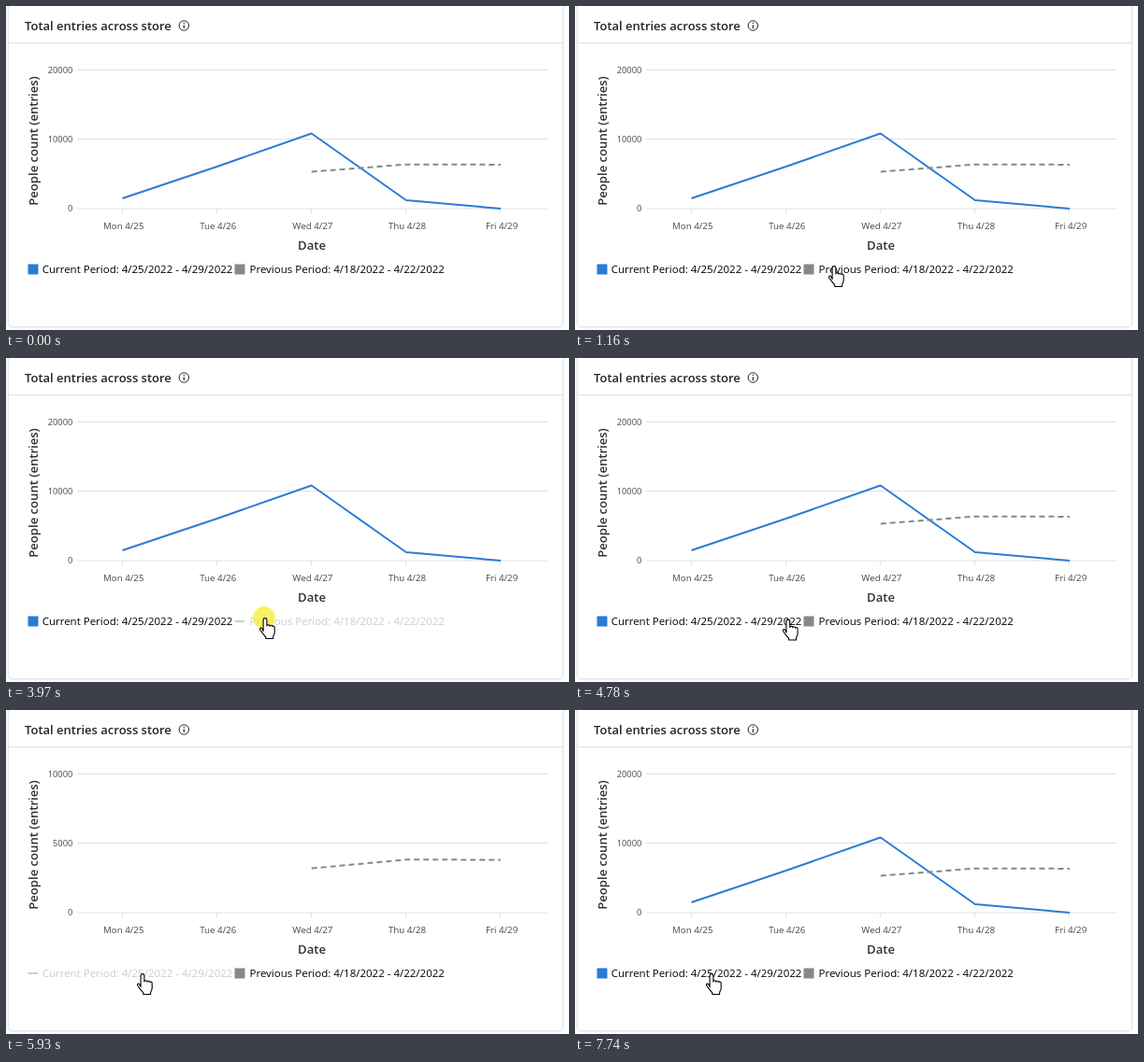
An HTML page that plays this animation: 602 px wide and 347 px high, repeating every 8 s.

```html
<!DOCTYPE html>
<html lang="en">
<head>
<meta charset="utf-8">
<title>Total entries across store</title>
<style>
  html, body { margin: 0; width: 100%; height: 100%; overflow: hidden; background: #fff; }
  svg { display: block; width: 100%; height: 100%; font-family: "Open Sans", "Noto Sans", sans-serif; }
  .card { fill: #fff; filter: drop-shadow(0 .6px 1.4px rgba(0, 0, 0, .28)); }
  .rule { stroke: #e1e1e1; }
  .title { font-size: 13px; font-weight: 600; fill: #252423; }
  .axis { font-size: 13.1px; font-weight: 600; fill: #323130; text-anchor: middle; }
  .tick { font-size: 9.75px; fill: #484644; }
  .value { font-size: 9.3px; text-anchor: end; }
  .line { fill: none; stroke-width: 2; stroke-linejoin: bevel; }
  .legend { font-size: 11.5px; fill: #000; }
  .legend .dash { display: none; }
  .legend.off { fill: #ccc; }
  .legend.off .box { display: none; }
  .legend.off .dash { display: inline; }
  .cursor { fill: #fff; stroke: #000; stroke-width: 1.1; stroke-linejoin: round; }
</style>
</head>
<body>
<svg viewBox="0 0 602 347">
  <rect class="card" x="3" y="-6" width="592" height="349" rx="4"/>
  <path class="rule" d="M3 39.5H595"/>
  <text class="title" x="20" y="25.6">Total entries across store</text>
  <g fill="none" stroke="#252423">
    <circle cx="190.3" cy="21" r="5.2"/>
    <path d="M190.3 20.2V24M190.3 17.8V19.1" stroke-width="1.2"/>
  </g>

  <g id="grid"></g>
  <text class="axis" transform="translate(34 144.5) rotate(-90)">People count (entries)</text>
  <text class="axis" x="327" y="261">Date</text>

  <path id="current" class="line" stroke="#2b7cd3"/>
  <path id="previous" class="line" stroke="#888" stroke-dasharray="6 4"/>

  <g id="currentKey" class="legend">
    <rect class="box" x="23.5" y="276.5" width="11" height="11" fill="#2b7cd3"/>
    <path class="dash" d="M24 282H34" stroke="#ccc" stroke-width="2"/>
    <text x="38.7" y="286">Current Period: 4/25/2022 - 4/29/2022</text>
  </g>
  <g id="previousKey" class="legend">
    <rect class="box" x="244.5" y="276.5" width="11" height="11" fill="#888"/>
    <path class="dash" d="M245 282H255" stroke="#ccc" stroke-width="2"/>
    <text x="260.5" y="286">Previous Period: 4/18/2022 - 4/22/2022</text>
  </g>

  <circle id="click" r="12" fill="#f5ee1e" opacity=".68"/>
  <g id="cursor" class="cursor">
    <path id="arrow" d="M0 0V15.5L3.6 12.2 6 17.6 8.3 16.6 6 11.4H11Z"/>
    <path id="hand" d="M-1.9 14V2a1.9 1.9 0 0 1 3.8 0V8.4c.2-1.6 3-1.4 3 .3c.2-1.5 2.9-1.2 2.9 .5c.2-1.3 2.4-1 2.4 1V15.4c0 2-1.6 3-1.6 5V22H.8V20.4C-.6 18.4-3.2 16-5.2 12.8c-1-1.8 1-3 2-1.6z"/>
  </g>
</svg>
<script>
const LOOP = 8000, BASE = 217;
const days = ["Mon 4/25", "Tue 4/26", "Wed 4/27", "Thu 4/28", "Fri 4/29"];
const currentHeights = [11, 45, 80.5, 9, 0];
const previousHeights = [39.5, 47.3, 47.1];

const el = id => document.getElementById(id);
const dayX = i => 124.5 + 101.1 * i;
const between = (t, a, b) => t >= a && t < b;
const show = (id, on) => { el(id).style.display = on ? "" : "none"; };
const lerp = (a, b, p) => a + (b - a) * p;

// Index of the last of `count` evenly spaced steps reached at time t (-1 before the first).
const stepAt = (t, start, end, count) => t < start ? -1 :
  Math.min(count - 1, Math.floor((t - start) / (end - start) * (count - 1) + .15));

// The easing starts a quarter step after the first redraw.
const cubicInOut = p => p < .5 ? 4 * p ** 3 : 1 - 4 * (1 - p) ** 3;
const rescale = (t, start, end) =>
  cubicInOut(Math.max(0, (stepAt(t, start, end, 6) - .25) / 4.75));

const linePath = (heights, firstDay, scale) => "M" + heights
  .map((h, i) => `${dayX(firstDay + i).toFixed(1)} ${(BASE - h * scale).toFixed(2)}`).join("L");

function buildGrid() {
  const rows = [68.5, 142.5, 217].map((y, i) =>
    `<path class="rule" d="M76 ${y}H579"/>
     <text class="tick value" x="71.3" y="${y + 3}">${i === 2 ? 0 : ""}</text>`);
  const columns = days.map((day, i) =>
    `<path class="rule" d="M${Math.floor(dayX(i)) + .5} 217V222"/>
     <text class="tick" x="${dayX(i) + 1.2}" y="239" text-anchor="middle">${day}</text>`);
  el("grid").innerHTML = rows.concat(columns).join("");
}

function pointerAt(t) {
  if (t < 1160) {
    const p = stepAt(t, 260, 1030, 12) / 11;
    return [lerp(436, 277, p), lerp(338, 279.5, p)];
  }
  const p = (stepAt(t, 4650, 5130, 8) + 1) / 8;
  return [lerp(277, 146, p), lerp(278.5, 282.5, p)];
}

function render(t) {
  const currentOff = between(t, 5800, 7420);
  const previousOff = between(t, 2040, 4120);
  const scale = t < 7420 ? 1 + rescale(t, 5800, 6140) : 2 - rescale(t, 7420, 7740);

  show("current", !currentOff);
  show("previous", !previousOff);
  el("currentKey").classList.toggle("off", currentOff);
  el("previousKey").classList.toggle("off", previousOff);
  el("previous").setAttribute("d", linePath(previousHeights, 2, scale));
  topLabel.textContent = currentOff ? 10000 : 20000;
  midLabel.textContent = currentOff ? 5000 : 10000;

  const [x, y] = pointerAt(t);
  show("cursor", t >= 260);
  show("arrow", y >= 290);
  show("hand", y < 290);
  el("cursor").setAttribute("transform", `translate(${x} ${y})`);

  const clicks = [[1840, 2040], [3970, 4120], [5660, 5800], [7280, 7420]];
  show("click", clicks.some(([a, b]) => between(t, a, b)));
  el("click").setAttribute("transform", `translate(${x - 1} ${y - .5})`);
}

buildGrid();
const [topLabel, midLabel] = document.querySelectorAll(".value");
el("current").setAttribute("d", linePath(currentHeights, 0, 1));

const origin = performance.now();
function tick() {
  render((performance.now() - origin) % LOOP);
  requestAnimationFrame(tick);
}
tick();
</script>
</body>
</html>
```
